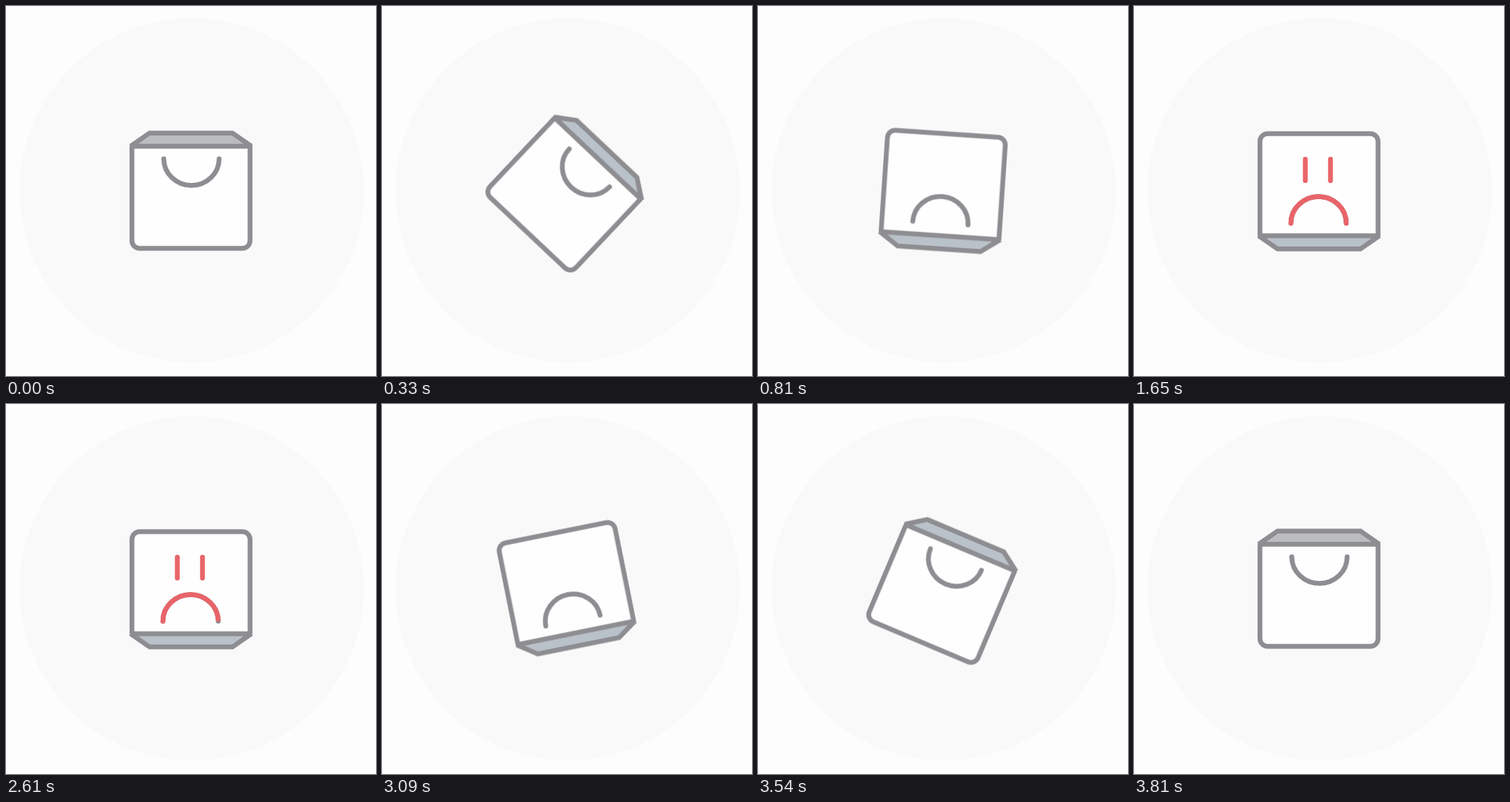
Write an HTML page without scripts that moves like this. It is 500x500 px and loops after 4530 ms.

```html
<!DOCTYPE html>
<html lang="en">
<head>
<meta charset="utf-8">
<title>Sad shopping bag</title>
<style>
  html, body { margin: 0; width: 100%; height: 100%; overflow: hidden; background: #fdfdfd; }
  svg { display: block; width: 100%; height: 100%; }

  .bag {
    fill: none;
    stroke: #8e8d92;
    stroke-width: 6.5;
    transform-origin: 250px 250px;
    animation: flip 4530ms infinite;
  }
  .body { fill: #fefefe; }
  .lid { stroke-miterlimit: 2; animation: tint 4530ms step-end infinite; }
  .handle, .face { stroke-linecap: round; }
  .face {
    stroke: #e96469;
    stroke-dasharray: 1 2;
    animation: draw 4530ms infinite;
  }

  /* Turn over, rest, turn back; both turns overshoot slightly */
  @keyframes flip {
    0% { transform: rotate(0deg); animation-timing-function: cubic-bezier(.545, 0, .575, 1.196); }
    19.868%, 64.238% { transform: rotate(180deg); animation-timing-function: cubic-bezier(.545, 0, .575, 1.196); }
    84.106%, 100% { transform: rotate(0deg); }
  }
  @keyframes tint {
    0% { fill: #bcbdc1; }
    .66% { fill: #b9c1c9; }
    84.1%, 100% { fill: #bcbdc1; }
  }
  @keyframes draw {
    0%, 23.84% { stroke-dashoffset: 1; visibility: hidden; }
    23.841% { stroke-dashoffset: 1; visibility: visible; animation-timing-function: cubic-bezier(.333, 0, .667, 1); }
    36.424% { stroke-dashoffset: 0; visibility: visible; }
    56.954% { stroke-dashoffset: 0; visibility: visible; animation-timing-function: cubic-bezier(.333, 0, .667, 1); }
    64.238% { stroke-dashoffset: 1; visibility: visible; }
    64.239%, 100% { stroke-dashoffset: 1; visibility: hidden; }
  }
</style>
</head>
<body>
<svg viewBox="0 0 500 500">
  <circle cx="251" cy="249.3" r="232.7" fill="#f9f9f9"/>
  <g class="bag">
    <path class="body" d="M170.2 189.5V317a10.5 10.5 0 0 0 10.5 10.5H319.3a10.5 10.5 0 0 0 10.5-10.5V189.5"/>
    <path class="lid" d="M168.5 189.5L194 171.7H306L331.5 189.5Z"/>
    <path class="handle" d="M288 206.5A37.4 36 0 0 1 213.2 206.5"/>
    <path class="face" pathLength="1" d="M288 206.5A37.4 36 0 0 1 213.2 206.5"/>
    <path class="face" pathLength="1" d="M268.5 293V264"/>
    <path class="face" pathLength="1" d="M234.5 293V264"/>
  </g>
</svg>
</body>
</html>
```
